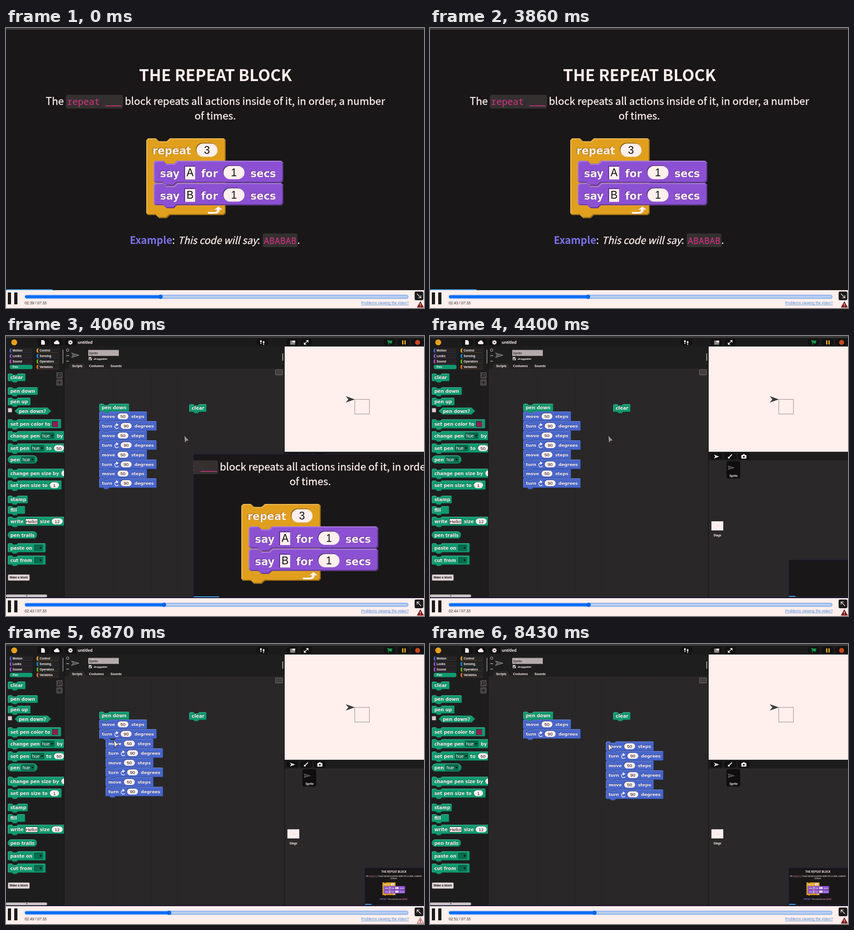
Animation of 915 by 612 pixels, one loop 8.5 s. Source, as an HTML page with a canvas:

```html
<!DOCTYPE html>
<html lang="en">
<head>
<meta charset="utf-8">
<title>The repeat block</title>
<style>
html, body { margin: 0; width: 100%; height: 100%; overflow: hidden; background: #191718; }
canvas { display: block; }
</style>
</head>
<body>
<canvas id="stage" width="915" height="612"></canvas>
<script>
const ctx = document.getElementById('stage').getContext('2d');
const LOOP = 8500;
const WHITE = '#ffefed', DARK = '#191718', BLACK = '#1c1b1c', PANE = '#2a2829';
const GREEN = '#109a70', BLUE = '#4866cb', PURPLE = '#8c51d2', ORANGE = '#e19f1e', PINK = '#d63384';
const SLIDE_FONT = '"Noto Sans CJK JP", "Noto Sans CJK SC", sans-serif';
const CODE_FONT = '"Noto Sans Mono", monospace';
const BLOCK_FONT = '"DejaVu Sans", sans-serif';
const UI_FONT = '"Liberation Sans", sans-serif';

// ---------- helpers ----------
function rect(x, y, w, h, color) {
  ctx.fillStyle = color;
  ctx.fillRect(x, y, w, h);
}
function round(x, y, w, h, r, color) {
  ctx.beginPath();
  ctx.roundRect(x, y, w, h, r);
  ctx.fillStyle = color;
  ctx.fill();
}
function poly(points, color, stroke, width = 1) {
  ctx.beginPath();
  points.forEach(([x, y]) => ctx.lineTo(x, y));
  if (color) { ctx.closePath(); ctx.fillStyle = color; ctx.fill(); }
  if (stroke) { ctx.strokeStyle = stroke; ctx.lineWidth = width; ctx.stroke(); }
}
function circle(x, y, r, color, stroke, width = 1) {
  ctx.beginPath();
  ctx.arc(x, y, r, 0, 7);
  if (color) { ctx.fillStyle = color; ctx.fill(); }
  if (stroke) { ctx.strokeStyle = stroke; ctx.lineWidth = width; ctx.stroke(); }
}
function text(str, x, y, font, color = WHITE, align = 'left') {
  ctx.font = font;
  ctx.fillStyle = color;
  ctx.textAlign = align;
  ctx.fillText(str, x, y);
}
const ui = (str, x, y, size, color, align) => text(str, x, y, `bold ${size}px ${UI_FONT}`, color, align);
// Running text of the slide, slightly thickened.
function prose(str, x, y, style = '22.45px', align) {
  text(str, x, y, `${style} ${SLIDE_FONT}`, WHITE, align);
  ctx.strokeStyle = WHITE;
  ctx.lineWidth = 0.35;
  ctx.strokeText(str, x, y);
}
function label(str, x, y, size) {
  const font = `bold ${size}px ${BLOCK_FONT}`, d = size * 0.06;
  y = Math.round(y);
  text(str, x - d, y - d, font, 'rgba(0,0,0,.35)');
  text(str, x, y, font);
}
function at(x, y, scale, draw) {
  ctx.save();
  ctx.translate(x, y);
  ctx.scale(scale, scale);
  draw();
  ctx.restore();
}
const clamp = x => Math.max(0, Math.min(1, x));
const smooth = x => { x = clamp(x); return x * x * (3 - 2 * x); };
const mix = (a, b, p) => a + (b - a) * p;

// ---------- programming blocks ----------
// Fills a shape, then lights its top left edges and shades its bottom right ones.
function raised(path, color, s = 1) {
  ctx.fillStyle = color;
  ctx.fill(path);
  ctx.save();
  ctx.clip(path);
  ctx.lineWidth = s;
  for (const [shift, edge] of [[-.5, 'rgba(0,0,0,.32)'], [.5, 'rgba(255,255,255,.24)']]) {
    at(shift * s, shift * s, 1, () => {
      ctx.strokeStyle = edge;
      ctx.stroke(path);
    });
  }
  ctx.restore();
}
function outline(points) {
  return new Path2D('M' + points.map(p => p.join(' ')).join('L') + 'Z');
}
function block(x, y, w, h, color, s = 1) {
  const r = 1.8 * s, a = 9 * s, b = 12 * s, c = 19 * s, d = 22 * s, n = 2.8 * s;
  raised(outline([[x, y + r], [x + r, y], [x + a, y], [x + b, y + n], [x + c, y + n], [x + d, y],
    [x + w - r, y], [x + w, y + r], [x + w, y + h - r], [x + w - r, y + h],
    [x + d, y + h], [x + c, y + h + n], [x + b, y + h + n], [x + a, y + h],
    [x + r, y + h], [x, y + h - r]]), color, s);
}
function ring(x, y, w, h, color) {
  const path = new Path2D();
  path.roundRect(x, y, w, h, h / 2);
  raised(path, color);
}
function numberSlot(str, cx, cy, w, h, size) {
  const d = h * .05;
  round(cx - w / 2 - d, cy - h / 2 - d, w, h, h / 2, 'rgba(0,0,0,.4)');
  round(cx - w / 2, cy - h / 2, w, h, h / 2, WHITE);
  text(str, cx, cy + size * .36, `${size}px ${UI_FONT}`, '#111', 'center');
}
function menuSlot(str, x, cy, w) {
  rect(x, cy - 6.5, w, 13, '#063f2e');
  rect(x + 1, cy - 5.5, w - 1, 12, '#0a6b4e');
  text(str, x + 2, cy + 3.5, `10px ${UI_FONT}`);
  poly([[x + w - 8, cy - 1.5], [x + w - 2, cy - 1.5], [x + w - 5, cy + 2.5]], '#071812');
}
function moveBlock(x, y) {
  block(x, y, 105, 21, BLUE);
  label('move', x + 6, y + 14, 9.4);
  numberSlot('50', x + 52, y + 10.5, 24, 13, 9.8);
  label('steps', x + 70, y + 14, 9.4);
}
function turnBlock(x, y) {
  block(x, y, 126, 21, BLUE);
  label('turn', x + 6, y + 14, 9.4);
  ctx.beginPath();
  ctx.arc(x + 38.5, y + 12, 4.3, 0.5, 4.6);
  ctx.strokeStyle = WHITE;
  ctx.lineWidth = 1.5;
  ctx.stroke();
  poly([[x + 37, y + 4], [x + 42.5, y + 8], [x + 37.5, y + 11.5]], WHITE);
  numberSlot('90', x + 59, y + 10.5, 24, 13, 9.8);
  label('degrees', x + 77, y + 14, 9.4);
}
function simpleBlock(str, x, y, w) {
  block(x, y, w, 17, GREEN);
  label(str, x + 5.5, y + 12, 9.85);
}

// ---------- slide ----------
function sayBlock(letter, y) {
  block(323, y, 284, 48.5, PURPLE, 2.35);
  label('say', 337, y + 36, 22.7);
  rect(390, y + 11, 24, 30, '#5c2f94');
  rect(392, y + 13, 22, 28, WHITE);
  text(letter, 403, y + 34, `23px ${UI_FONT}`, '#111', 'center');
  label('for', 427, y + 36, 22.7);
  numberSlot('1', 499, y + 26, 46, 29, 23);
  label('secs', 535, y + 36, 22.7);
}
function slideContent() {
  const code = `20px ${CODE_FONT}`;
  text('THE REPEAT BLOCK', 458.5, 116, `600 35px ${SLIDE_FONT}`, WHITE, 'center');
  prose('The', 87, 168);
  round(131, 146, 125, 30, 4, '#353030');
  text('repeat ___', 133.5, 168, code, PINK);
  prose('block repeats all actions inside of it, in order, a number', 260, 168);
  prose('of times.', 458, 200, undefined, 'center');

  block(307, 241, 174, 168, ORANGE, 2.35);
  label('repeat', 320.5, 276, 22.8);
  numberSlot('3', 440, 267, 46, 29, 23);
  sayBlock('B', 339);
  sayBlock('A', 290);
  ctx.fillStyle = WHITE;
  ctx.fill(new Path2D('M442 402H456Q462 402 462 397H456L465 390L474 397H468Q467 406 456 406H442Z'));

  text('Example', 271, 472, `600 22px ${SLIDE_FONT}`, '#7b72e9');
  prose(':', 363.5, 472);
  prose('This code will say', 376, 472, 'italic 21.6px');
  prose(':', 550, 472);
  round(562, 449, 76, 30, 4, '#353030');
  text('ABABAB', 564, 472, code, PINK);
  prose('.', 637.5, 472);
}
function slideWindow(t) {
  const p = 1 - (1 - clamp((t - 3950) / 400)) ** 2.385;
  const x = Math.round(785 * p), y = Math.round(mix(4, 489, p)), bottom = Math.round(mix(573, 570, p));
  ctx.save();
  ctx.beginPath();
  ctx.rect(x, y, 915 - x, bottom - y);
  ctx.clip();
  rect(x, y, 915, 600, DARK);
  if (p > 0) { rect(x, y, 1, 600, '#1c1a52'); rect(x, y, 915, 1, '#1c1a40'); }
  if (t < 4320) at(Math.floor(x / 2 + 3 * clamp(p * 5)), Math.floor((y + bottom - 577) / 2), 1, slideContent);
  else if (t > 4500) at(773.4, 481.2, 0.165, slideContent);
  rect(x + 1, bottom - 2, (915 - x) * .11, 2, '#3f9fe6');
  ctx.restore();
}

// ---------- editor ----------
const hue = x => ['menu', x, 'hue', 29];
const num = (x, value, w = 22) => ['num', x, value, w];
const PALETTE = [
  // shape, centre y, width, height, parts
  ['cmd', 90.5, 39, 17, 'clear'],
  ['cmd', 120.5, 66, 17, 'pen down'],
  ['cmd', 143.5, 50, 17, 'pen up'],
  ['cmd', 192, 117, 20, 'set pen color to', ['color', 101]],
  ['cmd', 218, 150, 20, 'change pen', hue(77), ['text', 111, 'by']],
  ['cmd', 245, 150, 20, 'set pen', hue(55), ['text', 88, 'to'], num(116, '50')],
  ['ring', 270, 65, 18, 'pen', hue(34)],
  ['cmd', 300, 150, 20, 'change pen size by', num(132, '')],
  ['cmd', 326, 118, 20, 'set pen size to', num(106, '1', 20)],
  ['cmd', 357.5, 44, 17, 'stamp'],
  ['cmd', 380.5, 38, 17, 'fill'],
  ['cmd', 405, 150, 20, 'write', ['field', 42, 'Hello!'], ['text', 74, 'size'], num(112, '12', 24)],
  ['ring', 435, 64, 16, 'pen trails'],
  ['cmd', 463, 83, 20, 'paste on', ['menu', 62, '', 19]],
  ['cmd', 490, 83, 20, 'cut from', ['menu', 62, '', 19]],
];
function palettePart([type, x, value, w], cy) {
  if (type === 'text') label(value, x, cy + 3.8, 9.85);
  if (type === 'menu') menuSlot(value, x, cy, w);
  if (type === 'num') numberSlot(value, x, cy, w, 13, 9.8);
  if (type === 'color') { rect(x, cy - 6, 13, 13, '#063f2e'); rect(x + 1, cy - 5, 12, 12, '#8d1e50'); }
  if (type === 'field') {
    rect(x, cy - 6, 28, 13, '#063f2e');
    rect(x + 1, cy - 5, 26, 11, WHITE);
    text(value, x + 1.5, cy + 4, `9.8px ${UI_FONT}`, '#111');
  }
}
function palette() {
  rect(0, 23, 128, 550, '#1e1d1e');
  const categories = [
    ['Motion', '#4a6cd4'], ['Looks', '#8f56e3'], ['Sound', '#b64ad9'], ['Pen', GREEN],
    ['Control', '#e6a822'], ['Sensing', '#0494dc'], ['Operators', '#62c213'], ['Variables', '#f3761d']];
  categories.forEach(([name, color], i) => {
    const x = i < 4 ? 8 : 67, y = 27 + 12 * (i % 4);
    round(x, y, 50, 9.5, 4, color);
    if (name !== 'Pen') round(x + 3, y, 47, 9.5, 3, '#262425');
    ui(name, x + 6.5, y + 7.2, 6.6);
  });
  rect(124, 30, 1.2, 30, '#b8b0b0');

  ctx.save();
  ctx.beginPath();
  ctx.rect(0, 74, 127, 500);
  ctx.clip();
  for (const [shape, cy, w, h, first, ...parts] of PALETTE) {
    (shape === 'cmd' ? block : ring)(4, cy - h / 2, w, h, GREEN);
    label(first, 9.5, cy + 3.8, 9.85);
    parts.forEach(part => palettePart(part, cy));
  }
  ctx.restore();
  raised(outline([[19, 164], [27, 156.5], [91, 156.5], [99, 164], [91, 171.5], [27, 171.5]]), GREEN);
  label('pen down?', 28, 168, 9.85);
  rect(4, 157.5, 9, 9, '#8d8586');
  rect(5, 158.5, 8, 8, '#d8cccd');

  for (const y of [79, 94.5]) round(110, y, 14, 14, 2, '#4a4647');
  circle(118, 85, 3, null, '#141314', 1.2);
  poly([[116, 87], [113, 90]], null, '#141314', 1.5);
  rect(113, 101, 8, 1.2, '#141314');
  rect(116.4, 97.5, 1.2, 8, '#141314');
  round(4, 521, 48, 14, 2.5, '#8f8789');
  round(5, 522, 46, 12, 2, '#e2d6d8');
  ui('Make a block', 28, 530.3, 6.4, '#111', 'center');
  round(0, 565, 90, 6, 3, '#c9c2c3');
  rect(44, 567, 3, 1.5, '#333');
}
function pointer(x, y, s, color) {
  poly([[x, y - 7 * s], [x + 20 * s, y], [x, y + 7 * s], [x + 6 * s, y]], color);
}
function toolbar() {
  rect(0, 4, 915, 19, BLACK);
  for (const x of [81, 111, 141, 561, 627, 657, 840, 870, 901]) round(x - 13, 6, 26, 15, 6, '#131213');
  circle(18, 14, 6.5, '#e8a01c');
  poly([[77, 9], [82, 9], [85, 12], [85, 19], [77, 19]], WHITE);
  circle(108, 15, 3, WHITE); circle(111.5, 13, 3.6, WHITE); circle(114.5, 15.5, 2.6, WHITE);
  rect(108, 15, 7, 3, WHITE);
  for (let i = 0; i < 4; i++) at(141, 14, 1, () => {
    ctx.rotate(i * Math.PI / 4);
    rect(-1.1, -5, 2.2, 10, WHITE);
  });
  circle(141, 14, 3.6, WHITE);
  circle(141, 14, 1.5, BLACK);
  ui('untitled', 157, 17, 9);
  for (const [x, y] of [[558, 12], [564, 14]]) {
    round(x - 1.7, y - 3, 3.4, 5, 1.7, WHITE);
    round(x - 1.2, y + 2.8, 2.4, 2.4, 1, WHITE);
  }
  rect(622, 10, 11, 9, '#8b8485');
  rect(627, 10, 6, 4, WHITE);
  poly([[654, 17], [660, 11]], null, WHITE, 1.5);
  poly([[656.5, 9], [662, 9], [662, 14.5]], WHITE);
  poly([[652, 13.5], [652, 19], [657.5, 19]], WHITE);
  poly([[835, 9], [840, 10], [846, 10], [844, 17], [838, 15]], '#0e9c4c');
  poly([[835, 9], [838, 19]], null, '#0e9c4c', 1.2);
  rect(867, 9.5, 3, 9, '#dca21c');
  rect(872, 9.5, 3, 9, '#dca21c');
  const k = 5.2, j = 2.2;
  poly([[-j, -k], [j, -k], [k, -j], [k, j], [j, k], [-j, k], [-k, j], [-k, -j]]
    .map(([x, y]) => [901 + x, 14 + y]), '#c8481c');
}
function spriteHeader() {
  rect(128, 23, 482, 48, '#1f1e1f');
  circle(135, 31, 2.8, null, '#c4bcbd', 1);
  poly([[132, 43], [138, 43]], null, '#c4bcbd', 1.4);
  poly([[132, 55], [138, 55]], null, '#c4bcbd', 1.2);
  poly([[143, 37], [160, 42], [143, 47], [147, 42]], '#565152', '#aaa2a3', .8);
  rect(180, 30.5, 67, 13, '#b5abad');
  text('Sprite', 181.5, 39.5, `7.5px ${UI_FONT}`, '#111');
  rect(181, 46, 7, 7, '#ddd2d3');
  poly([[182, 49], [184, 52], [188, 46]], null, '#111', 1.2);
  ui('draggable', 192, 52, 6.2);
  [['Scripts', 156, 30], ['Costumes', 198, 42], ['Sounds', 241, 34]].forEach(([name, x, w], i) => {
    const half = w / 2 + 4;
    poly([[x - half, 71], [x - half + 4, 60], [x + half - 4, 60], [x + half, 71]], i ? '#211f20' : PANE);
    ui(name, x, 67.5, 6.7, WHITE, 'center');
  });
  rect(605, 38, 1.5, 16, '#c9c1c2');
}
function scriptPane(drag) {
  rect(128, 71, 482, 502, PANE);
  for (let x = 130; x < 610; x += 4) rect(x, 71, 1, 502, '#242223');
  round(589, 73, 17, 13, 2, '#565152');
  for (let i = 0; i < 12; i++) rect(591.5 + i % 4 * 3.3, 75.5 + (i >> 2) * 3, 2, 1.6, '#1b1a1b');
  simpleBlock('clear', 401, 149, 38);
  // Later rows are painted first so that each tab overlaps the notch below it.
  for (let i = 7; i >= 0; i--) {
    const moved = i > 1 ? drag : 0;
    (i % 2 ? turnBlock : moveBlock)(Math.round(204 + 181 * moved), Math.round(165 + 20.9 * i + 6.5 * moved));
  }
  simpleBlock('pen down', 204, 148, 66);
}
function stageAndSprites() {
  rect(610, 23, 305, 230, WHITE);
  ctx.strokeStyle = '#978a8c';
  ctx.lineWidth = 1;
  ctx.strokeRect(763.5, 138.5, 32, 32);
  pointer(743.5, 138.5, 1, '#3d393b');

  rect(610, 253, 305, 320, PANE);
  rect(610, 253, 305, 19, '#1d1c1d');
  for (const x of [627, 657, 687]) round(x - 13, 256, 26, 14, 4, '#121112');
  pointer(621, 263.5, .6, WHITE);
  poly([[653, 267], [661, 259]], null, WHITE, 2);
  circle(654, 266, 2, WHITE);
  round(681.5, 260, 11, 8, 1.5, WHITE);
  rect(685, 258.5, 4, 2, WHITE);
  circle(687, 264, 2, '#121112');
  round(649, 273.5, 30, 38, 4, '#0f0e0f');
  poly([[652, 284], [666, 288], [652, 292], [655, 288]], '#3d393b', '#8b8485', .8);
  ui('Sprite', 664.5, 308, 6.3, WHITE, 'center');
  rect(616, 405, 26, 20, WHITE);
  rect(629, 414, 2, 2, '#d9cbcc');
  ui('Stage', 629, 438, 6.3, WHITE, 'center');
}
function cursor(t) {
  const out = smooth((t - 5850) / 740), back = smooth((t - 6730) / 530);
  const p = out - back;
  const x = mix(390, 210, p), y = mix(217.5, 209, p);
  ctx.globalAlpha = t < 5850 ? .55 : 1;
  poly([[0, 0], [10.5, 11], [5.2, 11.6], [1.8, 16.5], [0, 0]].map(([a, b]) => [x + a, y + b]),
    WHITE, '#1b1a1b', .9);
  ctx.globalAlpha = 1;
}
function editor(t) {
  toolbar();
  palette();
  spriteHeader();
  scriptPane(smooth((t - 6765) / 530));
  stageAndSprites();
  rect(127, 23, 1, 550, '#111');
  rect(609, 23, 1, 550, '#111');
  cursor(t);
  rect(0, 571, 915, 2, '#1a1533');
}

// ---------- player bar ----------
const TICKS = [[0, 159], [400, 160], [1400, 161], [2400, 162], [3270, 163], [4330, 164],
  [5200, 168], [6350, 169], [7250, 170], [8350, 171]];
function playerBar(t, small) {
  rect(0, 573, 915, 39, WHITE);
  rect(4, 578, 7, 26, '#1b1a1b');
  rect(18, 578, 7, 26, '#1b1a1b');

  const update = Math.max(0, Math.floor((t - 70) / 333)) * 333;
  const thumb = t < 70 ? 338.3 : t < 5200 ? 338.7 + update * .00195 : 354.4 + (update - 5140) * .00177;
  round(41, 583, 840, 9, 4.5, '#8db4f0');
  round(43, 585, 836, 5, 2, '#b9cdec');
  round(41.5, 584.5, thumb - 41, 6, 3, '#0a6cf5');
  circle(thumb, 587.5, 4.8, '#0b66e4');

  const seconds = TICKS.findLast(([start]) => t >= start)[1];
  const clock = `0${Math.floor(seconds / 60)}:${String(seconds % 60).padStart(2, '0')} / 07:33`;
  text(clock, 41, 604, `8.2px ${UI_FONT}`, '#2b2829');
  text('Problems viewing the video?', 777.5, 604, `8.2px ${UI_FONT}`, '#4a8ad8');
  rect(777.5, 605, 104, .8, '#4a8ad8');

  round(894.5, 576, 19, 19, 3, '#1b1a1b');
  at(904, 585.5, small ? -1 : 1, () => {
    poly([[-4.5, -4.5], [4, 4]], null, WHITE, 1.2);
    poly([[4.2, -1.5], [4.2, 4.2], [-1.5, 4.2]], null, WHITE, 1.2);
  });
  const pale = t > 5230 && t < 8390;
  poly([[907, 598], [914, 610.5], [900, 610.5], [907, 598]], pale ? '#f3d5d3' : '#7c1414', '#7c1414', .8);
  rect(906.3, 602, 1.5, 4.5, pale ? '#7c1414' : WHITE);
  rect(906.3, 607.5, 1.5, 1.5, pale ? '#7c1414' : WHITE);
}

function draw() {
  const t = performance.now() % LOOP;
  // Pictures change fifteen times a second.
  const step = Math.max(0, Math.floor((t + 12) * .015) / .015 - 10);
  const small = step > 3950;
  rect(0, 0, 915, 612, DARK);
  rect(0, 0, 915, 4.5, '#3a3839');
  if (small) editor(step);
  slideWindow(step);
  playerBar(t, small);
  requestAnimationFrame(draw);
}
draw();
</script>
</body>
</html>
```
